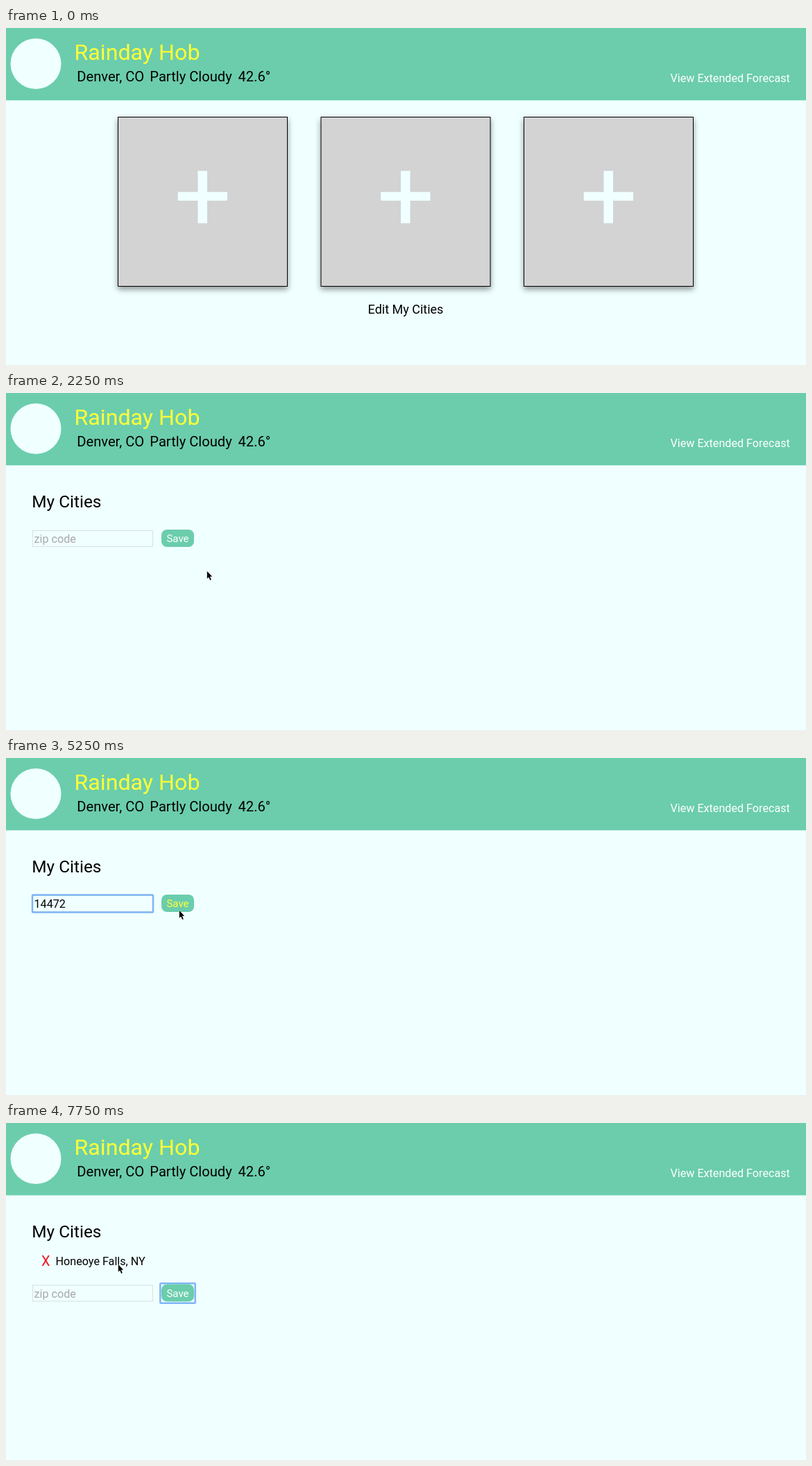
An HTML page that plays this animation: 1153 px wide and 486 px high, repeating every 8000 ms.

```html
<!DOCTYPE html>
<html lang="en">
<head>
<meta charset="utf-8">
<title>Weather page</title>
<style>
  html, body { margin: 0; width: 100%; height: 100%; overflow: hidden; background: #f0ffff; }
  svg { display: block; width: 100%; height: 100%; font-family: Roboto, Arial, sans-serif; }
  .card { fill: #d3d3d3; stroke: #000; filter: drop-shadow(0 4px 4px rgba(0, 0, 0, .42)); }
  .plus { fill: #f0ffff; }
  .ring { fill: none; stroke: #7db5f5; stroke-width: 2.5; }
</style>
</head>
<body>
<svg viewBox="0 0 1153 486" xmlns="http://www.w3.org/2000/svg">
  <rect width="1153" height="486" fill="#f0ffff"/>
  <rect width="1153" height="104.3" fill="#6bcdac"/>
  <circle cx="43" cy="51.5" r="36.5" fill="#f0ffff"/>
  <text x="98.5" y="46" font-size="32.2" fill="#ffff38">Rainday Hob</text>
  <g font-size="20.15">
    <text x="102.3" y="77">Denver, CO</text>
    <text x="207.3" y="77">Partly Cloudy</text>
    <text x="334.5" y="77">42.6°</text>
  </g>
  <text x="957.5" y="78" font-size="16.15" fill="#fff">View Extended Forecast</text>

  <g id="home">
    <g id="cards"></g>
    <text x="576" y="411.5" font-size="18" text-anchor="middle">Edit My Cities</text>
  </g>

  <g id="cities">
    <text x="37.3" y="165" font-size="24.4">My Cities</text>
    <g id="city">
      <text x="51" y="205.5" font-size="20" fill="#f5141c">X</text>
      <text x="71.6" y="204.5" font-size="16.15">Honeoye Falls, NY</text>
    </g>
    <g id="form">
      <rect x="38.5" y="198.5" width="173" height="23" fill="#f0ffff" stroke="#d8e0e0"/>
      <rect id="fieldRing" class="ring" x="38" y="197.5" width="174" height="25" rx="1"/>
      <text id="zip" x="40.5" y="216" font-size="16.15"></text>
      <rect id="saveRing" class="ring" x="222.3" y="195.8" width="50.4" height="28.4" rx="1"/>
      <rect x="224" y="197" width="47" height="25" rx="8" fill="#6bcdac"/>
      <text id="save" x="247.5" y="215.3" font-size="15" text-anchor="middle">Save</text>
    </g>
  </g>

  <path id="pointer" d="M0 0V10.8L2.4 8.5L4.3 12.9L6 12.2L4.1 7.8H7.4Z"
    stroke="#fff" stroke-width=".8" paint-order="stroke"/>
</svg>
<script>
const LOOP = 8000, TICK = 250;
const YELLOW = "#ffff38", AZURE = "#f0ffff";
const $ = id => document.getElementById(id);

// Each trip eases the pointer on from where the last one ended
const home = { x: 414, y: 34 };
const trips = [
  { from: 250, to: 1250, x: 269, y: 244 },
  { from: 1250, to: 1750, x: 290, y: 257 },
  { from: 2250, to: 3250, x: 147, y: 215 },
  { from: 4750, to: 5250, x: 250, y: 220 },
  { from: 5500, to: 6000, x: 431, y: 325 },
  { from: 6000, to: 6500, x: 416, y: 303 },
  { from: 6750, to: 7750, x: 162, y: 204 }
];

const clamp = v => Math.min(1, Math.max(0, v));
const ease = v => v * v * (3 - 2 * v);
const show = (id, on) => $(id).setAttribute("visibility", on ? "inherit" : "hidden");
const fill = (id, color) => { $(id).style.fill = color; };
const move = (id, x, y) => $(id).setAttribute("transform", `translate(${x} ${y})`);

function pointerAt(t) {
  return trips.reduce((p, trip) => {
    const k = ease(clamp((t - trip.from) / (trip.to - trip.from)));
    return { x: p.x + (trip.x - p.x) * k, y: p.y + (trip.y - p.y) * k };
  }, home);
}

// Two digits are typed per tick
function typedAt(t) {
  const count = t < 5500 ? Math.max(0, 2 * (t - 3750) / TICK) : 0;
  return "14472".slice(0, count);
}

$("cards").innerHTML = [0, 1, 2].map(i => `
  <g transform="translate(${161 + i * 292.5} 128)">
    <rect class="card" x=".5" y=".5" width="244" height="244"/>
    <g class="plus" id="plus${i}">
      <rect x="115.5" y="78" width="13.5" height="75.5"/>
      <rect x="86.7" y="108.5" width="71.3" height="12.5"/>
    </g>
  </g>`).join("");

function draw(time) {
  const t = Math.floor(time % LOOP / TICK) * TICK;
  const editing = t >= 2250, added = t >= 7000;
  $("home").style.display = editing ? "none" : "";
  $("cities").style.display = editing ? "" : "none";
  fill("plus0", t >= 1500 ? YELLOW : AZURE);

  show("city", added);
  move("form", 0, added ? 35.5 : 0);
  show("fieldRing", t >= 3250 && t < 5500);
  show("saveRing", t >= 5500);
  const typed = typedAt(t);
  $("zip").textContent = typed || "zip code";
  fill("zip", typed ? "#000" : "#a9a9a9");
  fill("save", t >= 5250 && t < 5750 ? YELLOW : "#fff");

  const { x, y } = pointerAt(t);
  show("pointer", t >= 250);
  move("pointer", x - .2, y);
}

const start = performance.now();
function loop() {
  draw(performance.now() - start);
  requestAnimationFrame(loop);
}
loop();
</script>
</body>
</html>
```
